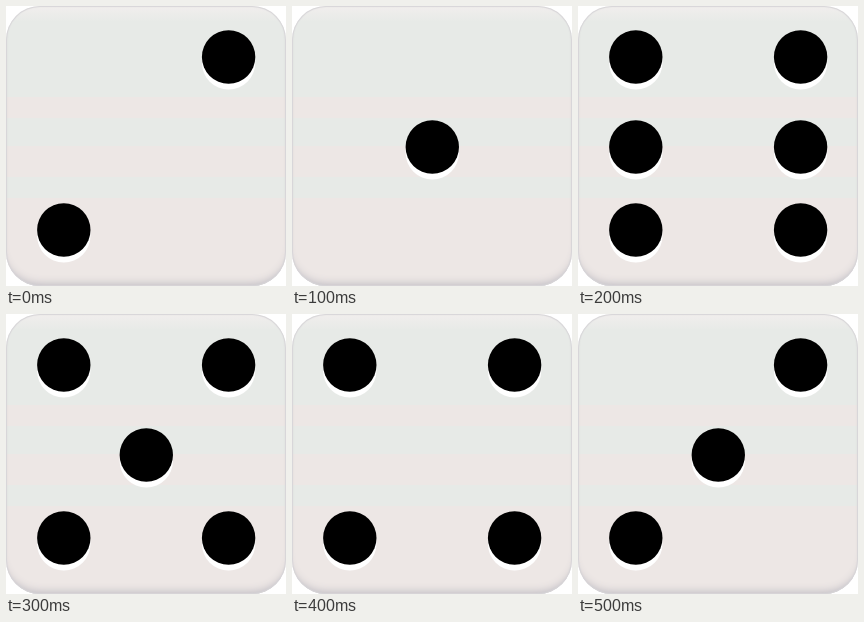
Recreate the animation shown at these times as an HTML page. Size 280 by 280 pixels, loop 0.6 s.

```html
<!DOCTYPE html>
<html lang="en">
<head>
<meta charset="utf-8">
<title>Rolling die</title>
<style>
  html, body { margin: 0; width: 100%; height: 100%; overflow: hidden; background: #fff; }
  .die {
    --cool: #e7eae7;
    --warm: #ede7e5;
    width: 280px;
    height: 280px;
    border-radius: 34px;
    background: linear-gradient(
      #f1eeed, var(--cool) 16px 91px, var(--warm) 91px 112px, var(--cool) 112px 140px,
      var(--warm) 140px 171px, var(--cool) 171px 192px, var(--warm) 192px);
    box-shadow:
      inset 0 0 1px 1px #d6d4d7,
      inset 0 -8px 8px -6px #bdbac1;
  }
  svg { display: block; }
</style>
</head>
<body>
<div class="die"><svg id="pips" width="280" height="280"></svg></div>
<script>
const STEP = 100, R = 26.7, RIM = 5.8;
const rolls = [2, 1, 6, 5, 4, 3];
const [left, center, right] = [57.8, 140.3, 222.6];
const [top_, middle, bottom] = [51, 141, 224];

const circle = (x, y, fill) => `<circle cx="${x}" cy="${y}" r="${R}" fill="${fill}"/>`;

// Each pip is a hole with a lit lower rim.
const pip = ([x, y]) => circle(x, y + RIM, '#fff') + circle(x, y, '#000');

function layout(n) {
  const spots = [];
  if (n % 2) spots.push([center, middle]);
  if (n > 1) spots.push([right, top_], [left, bottom]);
  if (n > 3) spots.push([left, top_], [right, bottom]);
  if (n === 6) spots.push([left, middle], [right, middle]);
  return spots;
}

const pips = document.getElementById('pips');
const start = performance.now();
let shown;

function draw() {
  const n = rolls[Math.floor((performance.now() - start) / STEP) % rolls.length];
  if (n !== shown) {
    pips.innerHTML = layout(n).map(pip).join('');
    shown = n;
  }
  requestAnimationFrame(draw);
}
draw();
</script>
</body>
</html>
```
